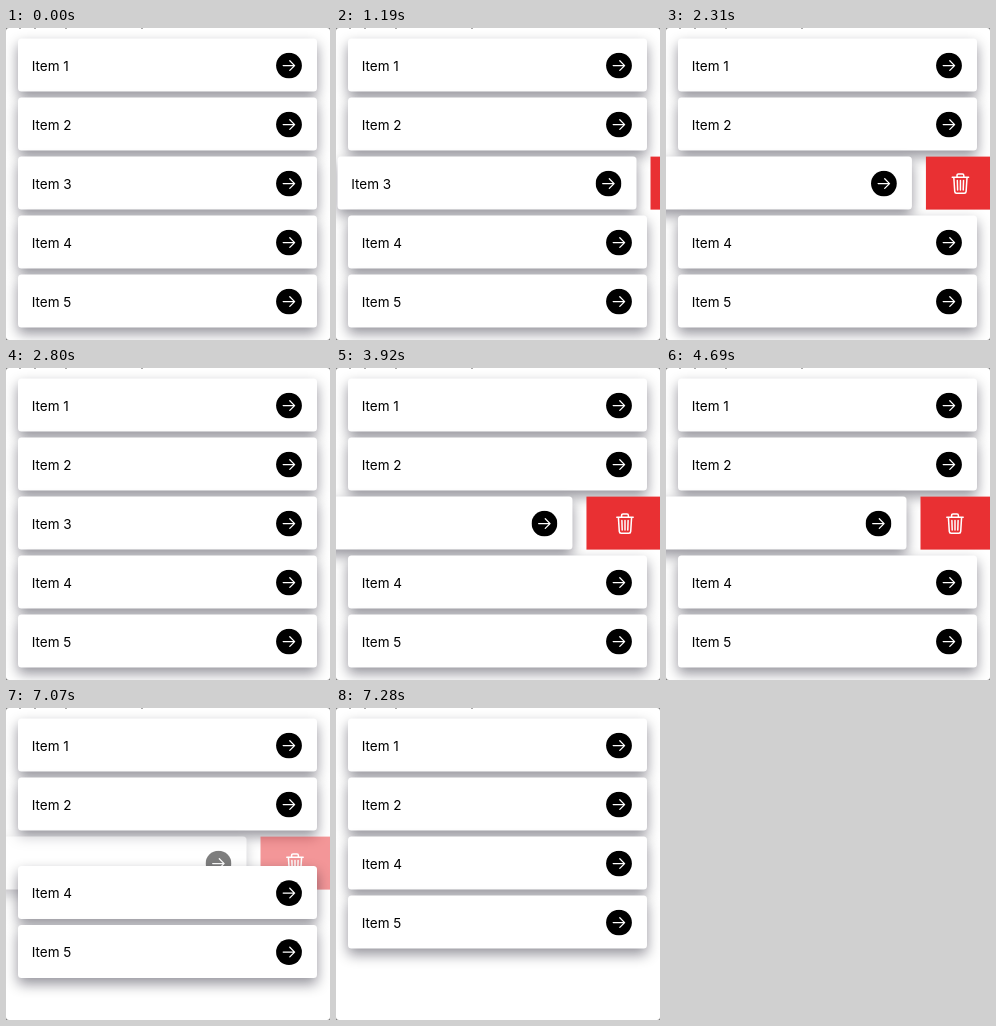
These frames come from a looping animation (324 by 312 pixels, 8000 ms). An HTML page:

```html
<!DOCTYPE html>
<html lang="en">
<head>
<meta charset="utf-8">
<title>Swipe to delete</title>
<style>
  html, body { margin: 0; width: 100%; height: 100%; overflow: hidden; background: #777; }
  #stage { position: absolute; left: 0; top: 0; width: 324px; height: 312px; overflow: hidden;
    background: #fff; border-radius: 3px; }
  .row { position: absolute; left: 0; top: 0; width: 324px; height: 53px; }
  .card { position: absolute; left: 12.3px; top: 0; width: 299px; height: 53px; border-radius: 3.5px;
    background: #fff; box-shadow: 0 6px 13px rgba(8, 4, 24, .43);
    font: 13.5px/53px Inter, "Liberation Sans", sans-serif; color: #000; }
  .card span { position: absolute; left: 13.4px; top: .5px; white-space: pre; }
  .card svg { position: absolute; left: 257.7px; top: 13.5px; }
  .delete { position: absolute; left: 324.5px; top: 0; width: 120px; height: 53px; background: #e93033; }
  .trash { position: absolute; left: 279px; top: 15.8px; }
  .speck { position: absolute; top: 0; width: 2px; height: 1px; background: #aaa; }
  svg { fill: none; stroke: #fff; stroke-linecap: round; stroke-linejoin: round; }
</style>
</head>
<body>
<div id="stage"></div>
<script>
const LOOP = 8000, TICK = 70, PITCH = 59, TOP = 10.6, OPEN = 70.5, PULL = 101;
const stage = document.getElementById('stage');

const arrow = `<svg width="26" height="26" stroke-width="1.3">
  <circle cx="13" cy="13" r="12.9" fill="#000" stroke="none"/>
  <path d="M7.2 13H18.6M13.8 8.2L18.6 13L13.8 17.8"/></svg>`;
const trash = `<svg class="trash" width="20" height="23" stroke-width="1.5">
  <path d="M1.8 4.6H18.2M6.6 4.4V2.8Q6.6 1.4 8 1.4H12Q13.4 1.4 13.4 2.8V4.4
    M3.4 4.8L4.3 18.8Q4.4 20.6 6.1 20.6H13.9Q15.6 20.6 15.7 18.8L16.6 4.8
    M10 7.8V17.5M6.9 7.8L7.2 17.5M13.1 7.8L12.8 17.5"/></svg>`;

// Remains of the line of text scrolled off the top
for (const x of [13, 28, 59, 135]) {
  const speck = document.createElement('i');
  speck.className = 'speck';
  speck.style.left = `${x}px`;
  stage.append(speck);
}

const rows = [1, 2, 3, 4, 5].map(n => {
  const row = document.createElement('div');
  row.className = 'row';
  row.innerHTML = `<div class="card"><span>Item ${n}</span>${arrow}</div>`;
  if (n === 3) row.insertAdjacentHTML('beforeend', `<div class="delete"></div>${trash}`);
  stage.append(row);
  return row;
});
const [card, red, bin] = rows[2].children;

const easeOut = k => p => 1 - (1 - p) ** k;
const easeInOut = k => p => p < .5 ? (2 * p) ** k / 2 : 1 - (2 - 2 * p) ** k / 2;

const swipe = [
  { start: 1190, steps: 12, from: 0, to: OPEN, ease: easeOut(1.85) },
  { start: 2310, steps: 8, from: OPEN, to: 0, ease: easeInOut(1.35) },
  { start: 3500, steps: 12, from: 0, to: PULL, ease: easeOut(1.53) },
  { start: 4340, steps: 6, from: PULL, to: OPEN, ease: easeOut(2) }
];
const removal = [{ start: 6930, steps: 6, from: 0, to: 1, ease: easeInOut(2) }];

// Motion advances once per tick and holds after the last step
function valueAt(moves, t) {
  const move = moves.filter(m => m.start <= t).pop();
  if (!move) return moves[0].from;
  const step = Math.floor((t - move.start) / TICK) + 1;
  return move.from + (move.to - move.from) * move.ease(Math.min(1, step / move.steps));
}

const shift = (el, x, y = 0) => { el.style.transform = `translate(${x}px, ${y}px)`; };

function draw(t) {
  const open = valueAt(swipe, t), gone = valueAt(removal, t);
  rows.forEach((row, i) => shift(row, 0, TOP + PITCH * (i - (i > 2 ? gone : 0))));
  shift(card, -open);
  shift(red, -open);
  shift(bin, Math.max(0, OPEN - open));
  rows[2].style.opacity = 1 - gone;
}

const begin = performance.now();
function frame() {
  draw((performance.now() - begin) % LOOP);
  requestAnimationFrame(frame);
}
draw(0);
requestAnimationFrame(frame);
</script>
</body>
</html>
```
